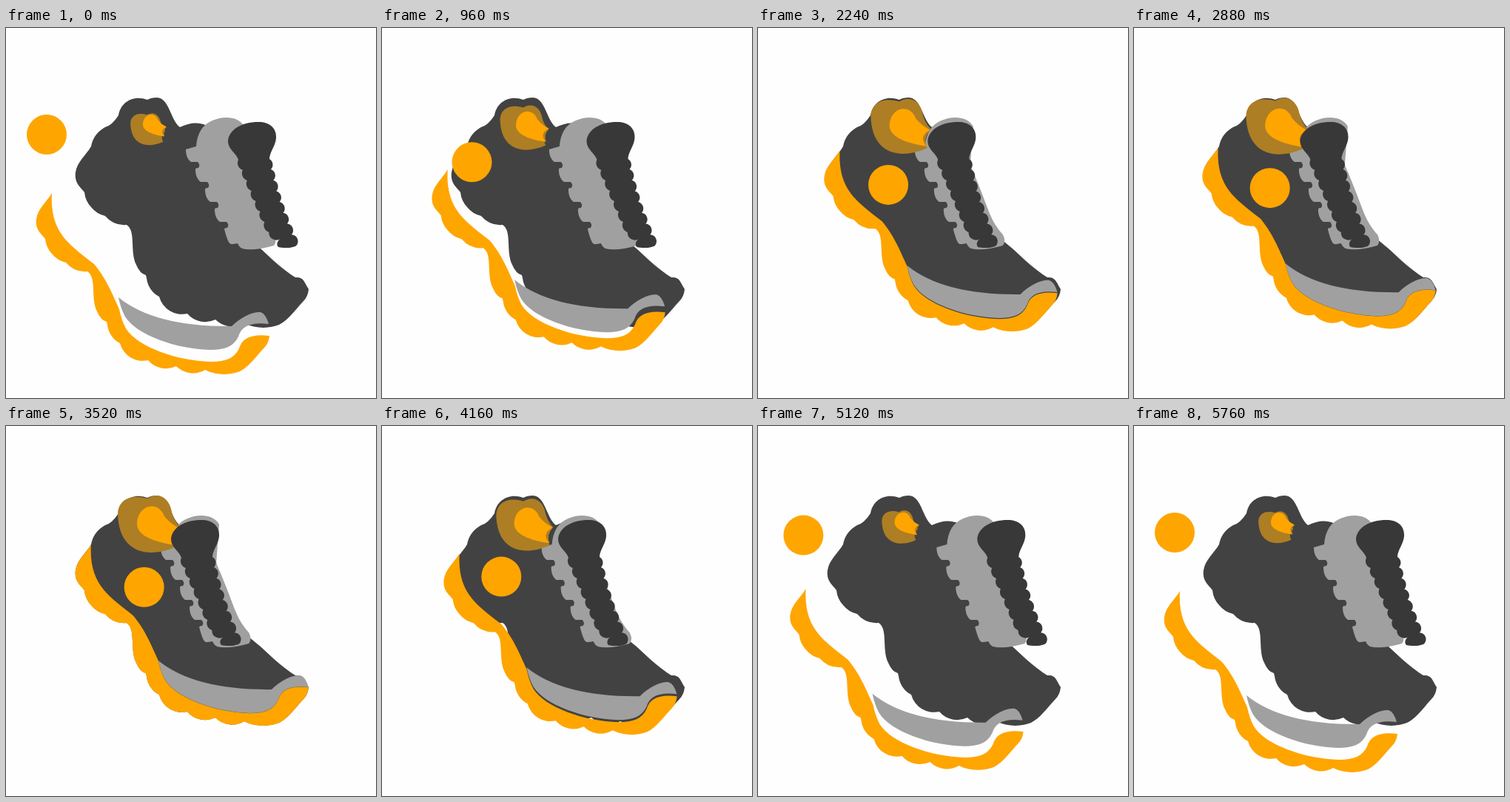
These frames come from a looping animation (500x500 px, 5840 ms). An HTML page:

```html
<!DOCTYPE html>
<html lang="en">
<head>
<meta charset="utf-8">
<title>Shoe layers</title>
<style>
html, body { margin: 0; width: 100%; height: 100%; overflow: hidden; background: #fefefe; }
svg { display: block; width: 100vw; height: 100vh; }
</style>
</head>
<body>
<svg id="stage" viewBox="0 0 500 500"></svg>
<script>
const LOOP = 5840, STEP = 80, TURN = 3840, BACK = 1920;
const ORANGE = '#ffa500', BODY = '#424242', TONGUE = '#383838', GRAY = '#a0a0a0', LINING = '#ad7e24';
const stage = document.getElementById('stage');

function add(tag, attrs) {
  const el = document.createElementNS('http://www.w3.org/2000/svg', tag);
  for (const k in attrs) el.setAttribute(k, attrs[k]);
  return stage.appendChild(el);
}
const shape = (d, fill) => add('path', { d: d + 'Z', fill });

// Round bumps from point to point; a radius below 1 is scaled by the chord in the path itself.
const bumps = (points, r, sweep) => points.map(p => `A${r} ${r} 0 0 ${sweep} ${p}`).join('');
const row = (n, at) => Array.from({ length: n }, (_, i) => at(i));

// Edges that neighbouring layers share, in the assembled pose.
const edge = 'M115 160C108 172 96 181 94 195C92 210 101 215 106 222' +
  bumps([[115, 242], [134, 254], [163, 266]], 34, 0) +
  'C176 274 167 302 176 320Q181 332 189 334L190 338' +
  bumps([[207, 363], [245, 386], [283, 394], [322, 399]], 32, 0) +
  'C338 407 357 406 369 401C382 394 390 382 402 369Q408 363 409 353';
const inner = 'C385 350 372 356 368 370C362 383 350 388 330 388C285 387 230 368 215 343Q209 332 206 317';

shape(edge + 'C403 343 402 336 391 337C375 327 362 315 345 299L310 270 285 190 276 135' +
  'C264 126 250 127 235 134C222 124 221 95 204 94Q196 94 191 97C172 90 155 100 152 118' +
  'Q143 132 134 134Q118 143 115 160', BODY);

const stripe = shape('M206 317Q255 357 359 356C372 343 388 336 398 337Q405 339 409 353' + inner, GRAY);

const sole = shape(edge + inner + 'C194 290 187 274 172 256C140 230 112 215 115 160', ORANGE);

const tab = 'c0 7 2 13 7 17h9q4 4 1 8q-4 0 -4 2';
const flap = shape('M223 160L209 164' + tab.repeat(4) +
  'C266 290 268 293 273 292L279 291Q281 296 285 298Q300 302 328 294Q333 288 328 279' +
  'C308 255 312 250 284 185L288 133C280 118 258 119 245 125Q225 133 223 160', GRAY);

const lining = shape('M151 118C152 100 168 91 191 98C207 88 221 98 224 116Q227 128 235 136' +
  'Q222 149 230 163C192 180 152 172 151 118', LINING);
const drop = shape('M177 132C178 106 206 100 214 122Q222 132 234 138Q224 149 229 161' +
  'C200 157 177 148 177 132', ORANGE);
const fold = shape('M234 138Q217 147 229 161Q224 149 234 138', LINING);

const right = row(8, i => [281 + 3.1 * i + .26 * i * i, 191 + 14.7 * i]);
const left = row(8, i => [237 + 5.9 * i, 178 + 14 * i]).reverse();
const tongue = shape('M237 178C234 169 223 164 223 153C224 137 242 127 264 127' +
  'C279 127 289 135 288 149C287 160 279 168 279 177' + bumps(right, 9, 1) +
  'C312 297 299 298 291 296C287 292 291 286 295 284' + bumps(left, 10, 1), TONGUE);

const badge = add('circle', { cx: 187, cy: 218, r: 27, fill: ORANGE });

// Cubic ease with handles (.33, 0) and (0, 1).
function ease(x) {
  if (x <= 0) return 0;
  if (x >= 1) return 1;
  let lo = 0, hi = 1;
  for (let i = 0; i < 30; i++) {
    const s = (lo + hi) / 2;
    if (.99 * s * (1 - s) ** 2 + s ** 3 < x) lo = s; else hi = s;
  }
  return lo * lo * (3 - 2 * lo);
}

// 1 when the layers lie apart, 0 when the shoe is whole.
const gap = (t, delay, span) =>
  t < TURN ? 1 - ease((t - delay) / span) : ease((t - TURN) / BACK);

const shift = (el, dx, dy, open) =>
  el.setAttribute('transform', `translate(${dx * open} ${dy * open})`);

const shrink = (el, x, y, open) =>
  el.setAttribute('transform', `translate(${x} ${y}) scale(${1 - .44 * open}) translate(${-x} ${-y})`);

function draw(t) {
  const open = gap(t, 0, TURN);
  shift(sole, -53, 63, open);
  shift(stripe, -54, 47, open);
  shift(badge, -132, -74, open);
  shift(flap, 34, 0, open);
  shift(tongue, 77, 0, gap(t, 320, 3280));
  shrink(lining, 190, 142, open);
  shrink(drop, 195, 128, open);
  shrink(fold, 195, 128, open);
}

const start = performance.now();
function tick() {
  const t = (performance.now() - start + 8) % LOOP;
  draw(Math.floor(t / STEP) * STEP);
  requestAnimationFrame(tick);
}
tick();
</script>
</body>
</html>
```
